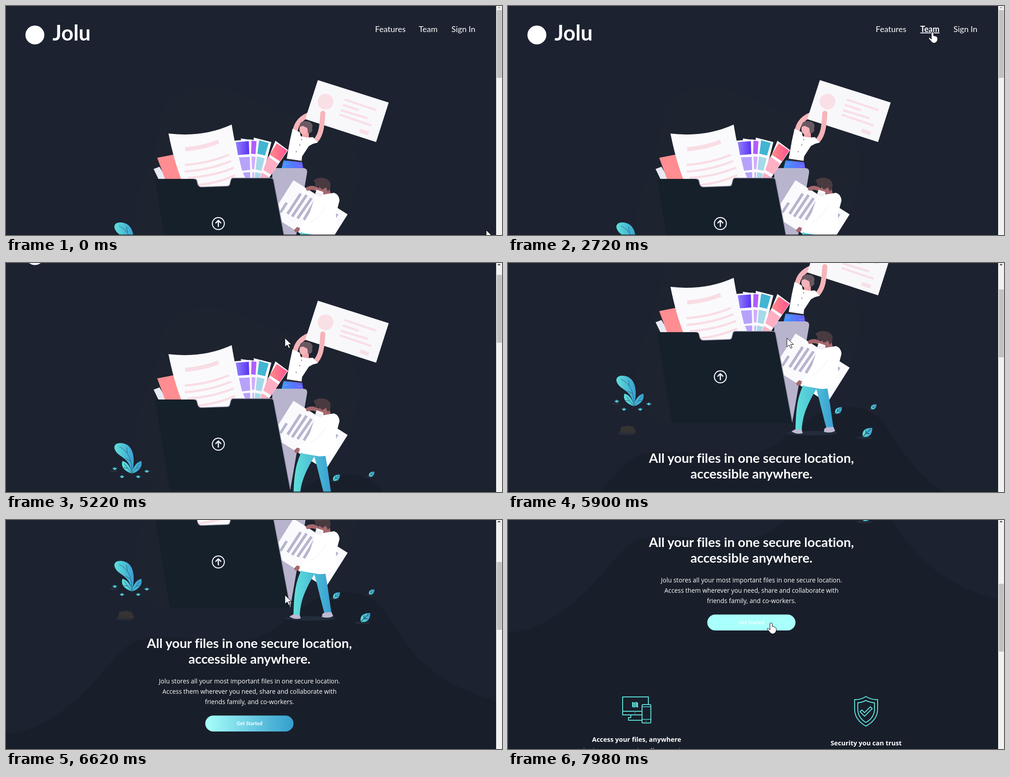
Write an HTML page that moves like this. It is 1099 by 510 pixels and loops after 8000 ms.

```html
<!DOCTYPE html>
<html lang="en">
<head>
<meta charset="utf-8">
<title>Landing page tour</title>
<style>
  html, body { margin: 0; width: 100%; height: 100%; overflow: hidden; background: #1c2230; }
  svg { display: block; width: 1099px; height: 510px; }
  text { fill: #fff; font-variant-ligatures: none; }
  .lato { font-family: Lato, sans-serif; }
  .open { font-family: "Open Sans", sans-serif; }
  .bold { font-weight: 700; }
  .mid { text-anchor: middle; }
  .over { font-weight: 700; text-decoration: underline; }
  .line { fill: none; stroke-linecap: round; stroke-linejoin: round; }
</style>
</head>
<body>
<svg viewBox="0 0 1099 510">
  <defs>
    <linearGradient id="teal"><stop stop-color="#5fe0da"/><stop offset="1" stop-color="#3a9fd2"/></linearGradient>
    <linearGradient id="button"><stop stop-color="#a8fffb"/><stop offset="1" stop-color="#339ecc"/></linearGradient>
    <linearGradient id="red"><stop stop-color="#ff8c86"/><stop offset="1" stop-color="#ff5392"/></linearGradient>
    <linearGradient id="purple"><stop stop-color="#9182ff"/><stop offset="1" stop-color="#5a32f2"/></linearGradient>
    <linearGradient id="jeans"><stop stop-color="#3f9bff"/><stop offset="1" stop-color="#6a5cff"/></linearGradient>
    <path id="sprout" d="M0 4Q-4 3-5-1L-2 0L0-3L2 0L5-1Q4 3 0 4Z" fill="#50c8d8"/>
    <g id="leaf">
      <path d="M-7 7C-9-3-3-7 8-7C8 3 3 9-7 7Z" fill="url(#teal)"/>
      <path d="M-7 7L5-5M-2 2L-2-3M-2 2L3 2" class="line" stroke="#1c4a5c"/>
    </g>
  </defs>

  <g id="page">
    <rect width="1086" height="1200" fill="#1c2230"/>
    <path d="M285 470C290 390 330 360 340 260C350 190 420 170 480 184C560 204 610 252 690 246C750 246 792 320 779 390C766 470 720 520 600 590H330C295 560 283 520 285 470Z" fill="#1d232f"/>
    <path d="M0 866C90 862 165 790 235 705C265 670 285 653 335 652C420 650 470 672 545 655C620 640 650 552 755 552C825 552 840 600 862 631C900 690 950 755 1086 794V1200H0Z" fill="#181f2a"/>

    <circle cx="64" cy="64.5" r="21" fill="#fff"/>
    <text x="103" y="77" class="lato bold" font-size="47">Jolu</text>
    <text x="1040" y="58" class="lato" font-size="18" text-anchor="end"><tspan class="link">Features</tspan><tspan class="link" dx="31">Team</tspan><tspan class="link" dx="31">Sign In</tspan></text>

    <!-- plants and rock -->
    <g fill="#262c38">
      <ellipse cx="239" cy="544" rx="9" ry="3"/><ellipse cx="313" cy="545" rx="8" ry="2"/>
      <ellipse cx="263" cy="611" rx="20" ry="3.5"/>
      <g fill="#232c3b"><ellipse cx="674" cy="610" rx="56" ry="5"/><ellipse cx="728" cy="566" rx="11" ry="2.5"/>
      <ellipse cx="806" cy="557" rx="9" ry="2"/><ellipse cx="789" cy="620" rx="17" ry="3"/></g>
    </g>
    <path d="M248 609L251 596L266 593L278 596L284 607L279 610Z" fill="#353433"/>
    <g transform="translate(279 550)">
      <path d="M0 0C8-30 6-66-24-68C-36-69-41-62-38-54C-30-34-6-40 0 0Z" fill="url(#teal)"/>
      <path d="M0 0C-2-14-10-26-21-28C-26-14-14-4 0 0ZM0 0C2-14 10-26 21-28C24-14 14-4 0 0Z" fill="url(#teal)"/>
      <path d="M0 0C1-30-8-50-28-60M-3-28L-14-34M-10-46L-12-58M0 0L-17-22M0 0L17-22M-9-12L-18-13M9-12L17-13" class="line" stroke="#246078"/>
    </g>
    <use href="#sprout" x="241" y="538"/><use href="#sprout" x="257" y="556"/>
    <use href="#sprout" x="293" y="556"/><use href="#sprout" x="312" y="544"/>
    <use href="#leaf" x="732" y="559"/>
    <use href="#leaf" transform="translate(810 551) scale(.8)"/>
    <use href="#leaf" transform="translate(796 608) scale(1.4)"/>

    <!-- man holding a certificate -->
    <path d="M641 277C644 260 656 249 669 243" class="line" stroke="#f5b4b9" stroke-width="11"/>
    <path d="M691 165L848 215L820 303L663 252Z" fill="#f8f8fb"/>
    <circle cx="708" cy="213" r="17.5" fill="#f9dfe6"/>
    <path d="M750 208L821 232M746 220L782 232M742 232L801 250M739 242L810 266" fill="none" stroke="#f9dfe7" stroke-width="5"/>
    <path d="M785 273L805 280L802 288L782 281Z" fill="#f9dfe7"/>
    <path d="M687 299C698 286 700 270 702 239" class="line" stroke="#f5b4b9" stroke-width="11"/>
    <path d="M656 275H671V294H656Z" fill="#f2a5ac"/>
    <path d="M635 273L651 281L653 290L667 293L680 292L691 304L680 307L671 312L656 335L655 345L622 340L629 300Z" fill="#fff"/>
    <ellipse cx="659" cy="274" rx="9" ry="12" fill="#f5b4b9"/>
    <path d="M651 269C649 259 659 254 667 257C676 257 682 265 678 272C681 280 674 284 669 283L668 272L658 267Z" fill="#695962"/>
    <path d="M655 297V298M651 309V310M643 324V325" class="line" stroke="#777b85" stroke-width="2"/>
    <path d="M615 344L656 347L659 364H610Z" fill="url(#jeans)"/>
    <path d="M621 340L655 345V348L619 344Z" fill="#302e38"/>
    <path d="M614 351Q620 357 626 350M645 355Q650 359 656 354" class="line" stroke="#9c8cff"/>

    <!-- folder contents -->
    <path d="M590 361H658Q669 361 667 372L630 585L590 383Z" fill="#b8b4cd"/>
    <path d="M327 363L340 358L360 392H341Z" fill="#e8eaf3"/>
    <path d="M335 338L371 331L390 390H354Z" fill="#ff8d91"/>
    <path d="M506 300L541 297L556 300L549 390H520ZM520 295L556 300L549 390ZM549 293L588 303L566 390H543ZM597 300L625 321L582 384L560 390Z" fill="#fafafe"/>
    <path d="M509 303L538 301L539 330L514 332Z" fill="url(#purple)"/>
    <path d="M516 337L540 336L541 365L523 367ZM525 371L541 370V383H530Z" fill="#b7a2fb"/>
    <path d="M544 300L555 301L553 330L543 329Z" fill="#b15dff"/>
    <path d="M544 335L553 336L550 364L545 363ZM546 370L550 371L549 383H546Z" fill="#d1acff"/>
    <path d="M561 299L582 305L574 333L557 329Z" fill="#41b5d2"/>
    <path d="M556 335L573 339L566 367L553 364ZM552 370L565 373L562 383H551Z" fill="#a5d9e9"/>
    <path d="M600 306L623 322L607 346L584 331Z" fill="url(#red)"/>
    <path d="M581 335L603 351L588 376L570 365ZM567 371L583 381L580 383H563Z" fill="#ffafc4"/>
    <path d="M360 284Q437 293 500 264Q510 325 528 392L495 405H425L390 390Q372 345 360 284Z" fill="#fafafd"/>
    <path d="M397 319Q440 315 471 302" fill="none" stroke="#f9dde4" stroke-width="9"/>
    <path d="M396 354Q450 350 494 331M396 369Q455 364 499 345M402 383Q460 379 505 360M425 399Q470 394 508 377" fill="none" stroke="#f9dde4" stroke-width="5"/>

    <!-- man carrying a sheet -->
    <path d="M637 388L757 464L708 542L588 466Z" fill="#fafafd"/>
    <path d="M608 460L622 438M624 463L653 418M634 469L666 421M646 473L677 428M660 476L685 434M729 471L734 463" fill="none" stroke="#b7b4ce" stroke-width="6"/>
    <path d="M331 389Q331 385 336 385H418Q422 385 423 389L425 397Q427 403 433 403L490 401Q495 401 496 396L498 388Q499 383 504 383H587Q591 383 592 387L630 585L628 588H367Q363 587 362 583Z" fill="#16202b"/>
    <path d="M416 385Q422 385 423 389L425 397Q427 403 433 403L490 401Q495 401 496 396L498 388Q499 383 504 383H587Q591 383 593 387L630 585" fill="none" stroke="#9997ac" stroke-width="1.5"/>
    <g class="line" stroke="#f4f5fa" stroke-width="2.2">
      <circle cx="470.5" cy="484.5" r="13.3"/>
      <path d="M470.5 491V478M465 483L470.5 477.5L476 483" stroke-width="2.6"/>
    </g>
    <path d="M669 407Q680 402 692 410" class="line" stroke="#a5686d" stroke-width="9"/>
    <path d="M694 401H716L720 421L694 419Z" fill="#a5686d"/>
    <path d="M681 389C690 380 710 380 718 392C721 400 718 409 713 413L709 404L700 409L694 402L684 403Q688 395 681 389Z" fill="#493a40"/>
    <path d="M655 500C645 525 638 540 637 604H651C652 570 664 545 683 512C690 535 695 560 706 600L721 597C716 565 712 530 706 502Z" fill="url(#teal)"/>
    <path d="M628 606L637 601L651 603L653 610Q640 614 628 606ZM701 600L706 597L721 596L725 605Q715 611 700 607Z" fill="#bfb9d3"/>
    <path d="M638 499L645 492L653 495L648 503L641 504Z" fill="#a5686d"/>
    <path d="M688 409L703 414V420L727 416Q738 420 739 433L731 464L733 500Q710 514 690 511L656 505L650 497L671 467L684 427Z" fill="#fff"/>
    <path d="M686 414L703 418L698 425L685 421Z" fill="#f0eff7"/>
    <path d="M708 445Q700 467 674 482" class="line" stroke="#ecebf4"/>

    <!-- intro copy -->
    <g class="lato bold mid" font-size="29">
      <text x="539.5" y="676">All your files in one secure location,</text>
      <text x="539.5" y="711">accessible anywhere.</text>
    </g>
    <g class="open mid" font-size="13.84">
      <text x="539.5" y="755">Jolu stores all your most important files in one secure location.</text>
      <text x="539.5" y="778">Access them wherever you need, share and collaborate with</text>
      <text x="539.5" y="801">friends family, and co-workers.</text>
      <text x="285" y="1134.5">Whether you are in the office or at home</text>
    </g>
    <rect id="cta" x="441.5" y="826.5" width="195.5" height="35.5" rx="17.75"/>
    <text x="539.5" y="848" class="lato bold mid" font-size="11.2">Get Started</text>

    <!-- features -->
    <g class="line" stroke="#60e0da" stroke-width="2">
      <path d="M297 1050H254V1010H311V1027M254 1042H297M272 1050V1056H267V1062H296"/>
      <rect x="297" y="1027" width="19.5" height="41" rx="2.5"/>
      <path d="M297 1032H316M297 1060H316" stroke-width="1.5"/>
      <path d="M281 1046V1046M306 1064V1064"/>
      <path d="M793 1009Q806 1017 819 1016V1037Q819 1061 793 1075Q768 1061 768 1037V1016Q781 1017 793 1009Z"/>
      <path d="M793 1018Q804 1023 812 1023V1037Q812 1056 793 1067Q775 1056 775 1037V1023Q783 1023 793 1018Z"/>
      <path d="M780 1043L784 1039L790 1045L803 1032L807 1036L790 1053Z"/>
    </g>
    <path d="M275 1021L279 1023L283 1021L288 1023V1034L283 1032L279 1034L275 1032Z" fill="#60e0da"/>
    <path d="M279 1024V1033M283 1022V1031" stroke="#181f2a"/>
    <g class="open bold mid" font-size="14.4">
      <text x="285" y="1110">Access your files, anywhere</text>
      <text x="793.5" y="1118">Security you can trust</text>
    </g>
  </g>

  <rect y="509" width="1086" height="1" fill="#10151e"/>
  <rect x="1086" width="13" height="510" fill="#f1f1f1"/>
  <path id="arrowUp" d="M1089 5L1092.5 1.5L1096 5Z"/>
  <rect id="thumb" x="1087.5" width="11" height="151" fill="#c1c1c1"/>

  <g id="cursor" fill="#fff" stroke="#000" stroke-linejoin="round">
    <path id="arrow" d="M0 0V20L5 15.5L8.5 23L11.5 21.5L8.2 14.5H14.5Z"/>
    <path id="hand" d="M-2.5 1.5Q0-1.5 2.5 1.5V8L5 8.5L8 9.5Q12 11 11.5 16Q11 20 9 22Q4 27-1 23L-8 15Q-9 11-5.5 13L-2.5 16Z"/>
  </g>
</svg>
<script>
const LOOP = 8000;
const $ = id => document.getElementById(id);
const links = document.querySelectorAll(".link");

// [first, last, steps]: the screen updates only in these bursts
const bursts = [
  [70, 180, 3], [510, 770, 5], [1040, 1790, 12], [2390, 2720, 6], [3410, 3670, 5],
  [4270, 4820, 9], [5020, 5430, 7], [5760, 6100, 6], [6490, 6770, 5], [7310, 7980, 10]
];
// [start, end, x, y]: glide to x,y within that time
const glides = [
  [20, 180, 1026, 194], [505, 505, 17, 486], [505, 770, 545, 187],
  [980, 1790, 850, 58], [2330, 2720, 940.5, 58], [3350, 3670, 1005, 58],
  [4205, 4270, 966, 57], [4270, 4820, 618, 167], [7600, 7980, 583, 229]
];
const hovers = [[1690, 2480], [2590, 3470], [3540, 4330]];
const wheelTurns = [[5004, 5430], [5696, 6096], [6475, 6770], [7250, 7600]];
const WHEEL_STEP = 154;

const within = (t, [from, to]) => t >= from && t < to;
function ease(t, from, to) {
  if (t >= to) return 1;
  const p = Math.max(0, (t - from) / (to - from));
  return p * p * (3 - 2 * p);
}

// Time of the latest screen update; the slack absorbs uneven spacing.
function lastUpdate(t) {
  const burst = bursts.findLast(([first]) => t >= first);
  if (!burst) return 0;
  const [first, last, steps] = burst;
  const gap = (last - first) / (steps - 1);
  return first + gap * Math.min(steps - 1, Math.floor((t - first) / gap + 0.2));
}

function cursorAt(t) {
  let x = 1064, y = 499;
  for (const [from, to, toX, toY] of glides) {
    const p = ease(t, from, to);
    x += (toX - x) * p;
    y += (toY - y) * p;
  }
  return [x, y];
}

function render(t) {
  const scroll = Math.round(WHEEL_STEP * wheelTurns.reduce((sum, turn) => sum + ease(t, ...turn), 0));
  $("page").setAttribute("transform", `translate(0 ${-scroll})`);
  $("thumb").setAttribute("y", 9 + scroll * 0.216);
  $("arrowUp").setAttribute("fill", scroll > 0 ? "#404040" : "#a3a3a3");

  const [x, y] = cursorAt(t);
  const onLink = hovers.map(span => within(t, span));
  links.forEach((link, i) => link.classList.toggle("over", onLink[i]));
  const onButton = t > 7600 && y > 826.5 - scroll;
  $("cta").setAttribute("fill", onButton ? "#a8fffb" : "url(#button)");

  const pointing = onButton || onLink.includes(true);
  $("hand").style.display = pointing ? "" : "none";
  $("arrow").style.display = pointing ? "none" : "";
  $("cursor").style.display = within(t, [180, 505]) ? "none" : "";
  $("cursor").setAttribute("transform", `translate(${x} ${y})`);
}

function tick() {
  render(lastUpdate(performance.now() % LOOP));
  requestAnimationFrame(tick);
}
tick();
</script>
</body>
</html>
```
